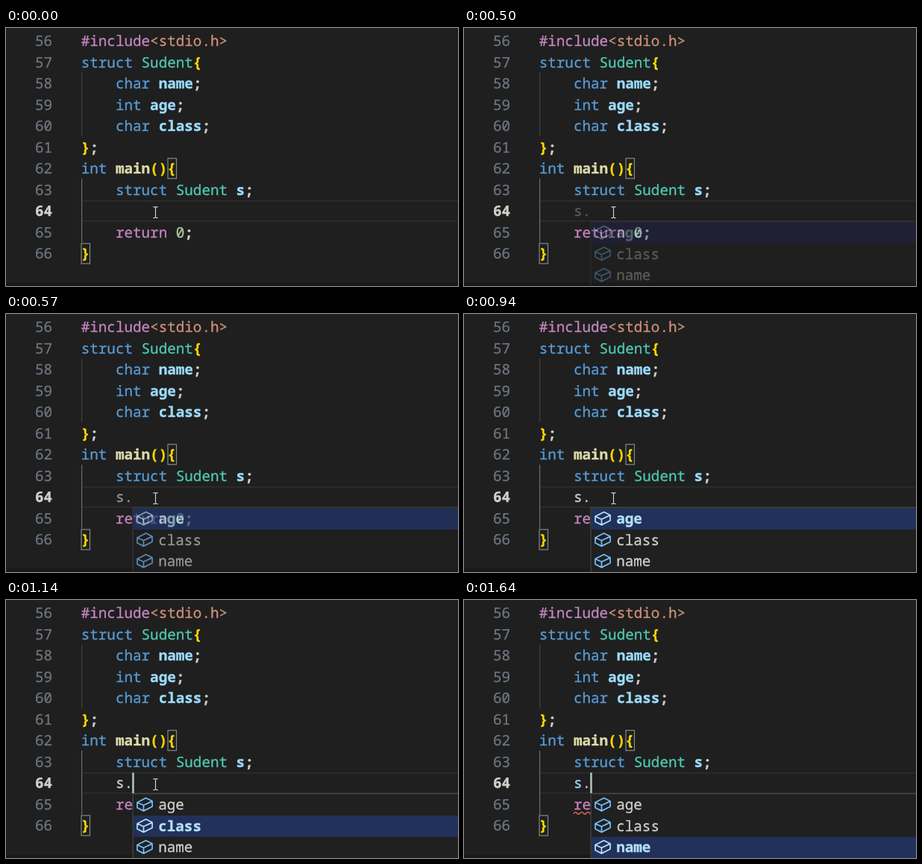
An HTML page for the animation above (2140 ms loop, 606 by 346 pixels).

```html
<!DOCTYPE html>
<html lang="en">
<head>
<meta charset="utf-8">
<title>Member completion</title>
<style>
  html, body { margin: 0; width: 100%; height: 100%; overflow: hidden; background: #1f1f1f; }
  svg { display: block; width: 606px; height: 346px; }
  text {
    font: 500 19.25px "Noto Sans Mono", "DejaVu Sans Mono", monospace;
    text-rendering: geometricPrecision;
    white-space: pre;
    stroke-width: 0.3px;
  }
  .strong { font-weight: 600; }
</style>
</head>
<body>
<svg id="stage" viewBox="0 0 606 346"></svg>
<script>
const stage = document.getElementById('stage');
const LEFT = 100.7, ADVANCE = 11.55, PITCH = 28.5, BASE = 24.2;
const C = {
  plain: '#d0d0cc', dir: '#c586c0', str: '#ce9178', key: '#569cd6', type: '#4ec9b0',
  brace: '#ffd700', name: '#9cdcfe', fn: '#dcdcaa', num: '#b5cea8', gutter: '#6e7681'
};

function add(parent, tag, attrs, content) {
  const el = document.createElementNS('http://www.w3.org/2000/svg', tag);
  for (const k in attrs) el.setAttribute(k, attrs[k]);
  if (content) el.textContent = content;
  parent.appendChild(el);
  return el;
}
const rect = (p, x, y, width, height, fill) => add(p, 'rect', { x, y, width, height, fill });
const paint = (el, color) => {
  el.setAttribute('fill', color);
  el.setAttribute('stroke', color);
};
const label = (p, x, y, color, s) => {
  const el = add(p, 'text', { x, y }, s);
  paint(el, color);
  return el;
};
const line = (p, d, stroke, w) =>
  add(p, 'path', { d, stroke, 'stroke-width': w, fill: 'none', 'stroke-linejoin': 'round' });
const show = (el, on) => el.setAttribute('visibility', on ? 'visible' : 'hidden');

// Each line: indent, then pairs of colour and text.
const code = [
  [0, 'dir', '#include', 'str', '<stdio.h>'],
  [0, 'key', 'struct ', 'type', 'Sudent', 'brace', '{'],
  [4, 'key', 'char ', 'name', 'name', 'plain', ';'],
  [4, 'key', 'int ', 'name', 'age', 'plain', ';'],
  [4, 'key', 'char ', 'name', 'class', 'plain', ';'],
  [0, 'brace', '}', 'plain', ';'],
  [0, 'key', 'int ', 'fn', 'main', 'brace', '(){'],
  [4, 'key', 'struct ', 'type', 'Sudent ', 'name', 's', 'plain', ';'],
  [0],
  [4, 'dir', 'return ', 'num', '0', 'plain', ';'],
  [0, 'brace', '}']
];
const strong = ['brace', 'plain', 'name', 'fn'];

rect(stage, 0, 0, 606, 346, '#1f1f1f');
rect(stage, 0, 341.5, 606, 4.5, '#181818');
rect(stage, 102, 231, 504, 2, '#2a2a2a');
rect(stage, 102, 258, 504, 2, '#2a2a2a');
rect(stage, 101, 60, 1.2, 85, '#404040');
rect(stage, 101, 202, 1.2, 86, '#66706c');
for (const [x, y] of [[217, 174.8], [101, 289]])
  add(stage, 'rect', { x, y, width: 11.5, height: 27, fill: '#1c211d', stroke: '#888888', 'stroke-width': 1.2 });

code.forEach(([col, ...parts], i) => {
  const y = BASE + i * PITCH;
  const active = i === 8;
  const number = label(stage, 39, y, active ? '#d2d2cc' : C.gutter, String(56 + i));
  number.classList.toggle('strong', active);
  for (let k = 0; k < parts.length; k += 2) {
    const token = label(stage, LEFT + col * ADVANCE, y, C[parts[k]], parts[k + 1]);
    token.classList.toggle('strong', strong.includes(parts[k]));
    col += parts[k + 1].length;
  }
});

const squiggle = line(stage, 'M147 287q2.15 -4 4.3 -1.2' + 't4.3 0'.repeat(5), '#f0684c', 1.4);

const fade = add(stage, 'g', {});
const typed = label(fade, LEFT + 4 * ADVANCE, BASE + 8 * PITCH, C.plain, 's');
label(fade, LEFT + 5 * ADVANCE, BASE + 8 * PITCH, C.plain, '.');
rect(fade, 169.4, 259, 437, 87, '#454545');
rect(fade, 170.7, 260.4, 436, 86, '#202020');
const bar = rect(fade, 170.7, 260.6, 436, 28.4, '#22305c');

const rows = ['age', 'class', 'name'].map((word, i) => {
  const y = 274.2 + i * PITCH;
  const icon = line(fade, 'M1.5 6.3L9 2.5L14.5 5.3V9.9L7 13.7L1.5 10.9ZL7 8.8L14.5 5.3M7 8.8V13.7', '#75beff', 1.1);
  icon.setAttribute('transform', `translate(${186 - 8 * 1.55} ${y - 8.1 * 1.55}) scale(1.55)`);
  return { icon, text: label(fade, 204.2, y + 6.9, C.plain, word) };
});

const caret = rect(stage, 169.2, 231.5, 2.5, 27.5, '#b3c6bd');
const beam = 'M197.3 239.8H199.4L200.5 240.8L201.6 239.8H203.7M200.5 240.8V253.6M197.3 254.6H199.4L200.5 253.6L201.6 254.6H203.7';
const mouse = add(stage, 'g', {});
line(mouse, beam, '#111111', 2.6);
line(mouse, beam, '#d4dcda', 1.2);

// at: start in ms, a: opacity of the new content, sel: chosen row
const LOOP = 2140;
const steps = [
  { at: 0, a: 0, sel: 0, bar: '#22305c' },
  { at: 500, a: 1 / 3, sel: 0, bar: '#222261' },
  { at: 570, a: 2 / 3, sel: 0, bar: '#233874' },
  { at: 640, a: 1, sel: 0, bar: '#22305c' },
  { at: 1140, a: 1, sel: 1, bar: '#22305c', caret: true },
  { at: 1640, a: 1, sel: 2, bar: '#22305c', caret: true, checked: true }
];

let current;
function apply(s) {
  fade.setAttribute('opacity', s.a);
  bar.setAttribute('fill', s.bar);
  bar.setAttribute('y', 260.6 + s.sel * PITCH);
  rows.forEach(({ icon, text }, i) => {
    const on = i === s.sel;
    icon.setAttribute('stroke', on ? '#b4e2f5' : '#75beff');
    paint(text, on ? '#b4e2f5' : C.plain);
    text.classList.toggle('strong', on);
  });
  paint(typed, s.checked ? C.name : C.plain);
  show(caret, s.caret);
  show(squiggle, s.checked);
  show(mouse, !s.checked);
}

const start = performance.now();
function tick() {
  const t = (performance.now() - start) % LOOP;
  const step = steps.filter(s => s.at <= t).pop();
  if (step !== current) apply(current = step);
  requestAnimationFrame(tick);
}
tick();
</script>
</body>
</html>
```
